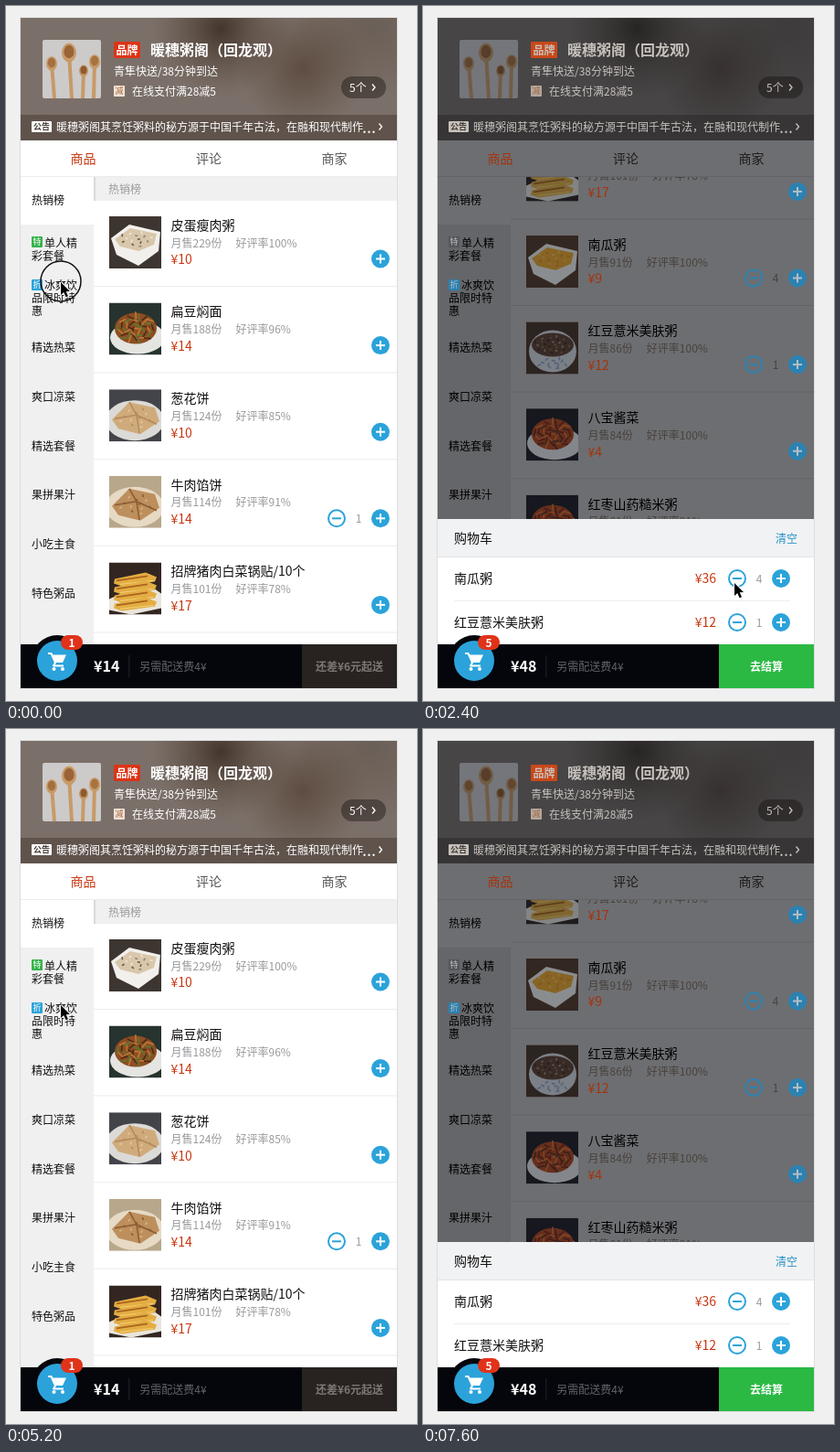
An HTML page with a canvas for the animation above (8 s loop, 450x760 px).

```html
<!DOCTYPE html>
<html lang="zh">
<head>
<meta charset="utf-8">
<style>
  html, body { margin: 0; width: 100%; height: 100%; overflow: hidden; background: #f0f0f0; }
  canvas { display: block; }
</style>
</head>
<body>
<canvas id="stage" width="450" height="760"></canvas>
<script>
const g = document.getElementById('stage').getContext('2d');
const FONT = '"Noto Sans CJK SC", "Noto Sans CJK", sans-serif';
const SHOP = '暖穗粥阁';

// [normal, behind the overlay]
const COLORS = {
  paper: ['#fff', '#6d6e71'], side: ['#f0f0f0', '#656669'], line: ['#ececec', '#626366'],
  ink: ['#111', '#000'], soft: ['#555', '#1d1b1a'], grey: ['#98999c', '#47423d'],
  red: ['#c8350f', '#a5330d'], blue: ['#2ba3da', '#2b82b2'], cross: ['#fff', '#b5bdc3'],
  head: ['#fff', '#c6c1bc'], brand: ['#dd3417', '#c9481a'], green: ['#35b34a', '#55565a']
};
let dim = 0;
const col = name => COLORS[name] ? COLORS[name][dim] : name;

// name, sold per month, rating, price, photo
const foods = [
  ['皮蛋瘦肉粥', 229, 100, 10, ['square', '#3d352f', '#f2f0ec', '#d9c7ab', ['#6b5a4b', '#f0e6d3', '#8d8578']]],
  ['扁豆焖面', 188, 96, 14, ['mound', '#26332e', '#e4e4e0', '#8d4d22', ['#c07a38', '#4b2a17', '#5d7a2f']]],
  ['葱花饼', 124, 85, 10, ['cake', '#43434a', '#dcdad6', '#cfab7c', ['#b48a58', '#e2c79c']]],
  ['牛肉馅饼', 114, 91, 14, ['cake', '#b9a78c', '#e6dac4', '#bd8f5c', ['#8a5c34', '#d8b282']]],
  ['招牌猪肉白菜锅贴/10个', 101, 78, 17, ['rolls', '#332621', '#e9e5dc', '#e3ad42', ['#a8641d', '#f4d27a']]],
  ['南瓜粥', 91, 100, 9, ['square', '#573a27', '#f6f3ee', '#efa92c', ['#f8c860', '#d98a18']]],
  ['红豆薏米美肤粥', 86, 100, 12, ['round', '#4b3424', '#d9dade', '#614230', ['#8f6b50', '#3a2318', '#b29577']]],
  ['八宝酱菜', 84, 100, 4, ['mound', '#221d22', '#e8e6e4', '#b4471e', ['#e0742f', '#7a2712', '#59301a']]],
  ['红枣山药糙米粥', 81, 91, 10, ['mound', '#221d22', '#e8e6e4', '#b4471e', ['#e0742f', '#7a2712', '#59301a']]],
  ['糊塌子', 80, 93, 10, ['cake', '#8d6a4b', '#a98461', '#d9bd8d', ['#b48f5c', '#c9a76f']]]
];
const BEEF = 3, PUMPKIN = 5, BEAN = 6;
const ROW = 94.6;

function rect(x, y, w, h, c, r = 0) {
  g.fillStyle = col(c);
  g.beginPath();
  g.roundRect(x, y, w, h, r);
  g.fill();
}
function oval(x, y, rx, ry, c, turn = 0) {
  g.fillStyle = col(c);
  g.beginPath();
  g.ellipse(x, y, rx, ry, turn, 0, 7);
  g.fill();
}
function poly(c, ...pts) {
  g.fillStyle = col(c);
  g.beginPath();
  for (let i = 0; i < pts.length; i += 2) g.lineTo(pts[i], pts[i + 1]);
  g.closePath();
  g.fill();
}
function stroke(c, width, ...pts) {
  g.strokeStyle = col(c);
  g.lineWidth = width;
  g.beginPath();
  for (let i = 0; i < pts.length; i += 2) g.lineTo(pts[i], pts[i + 1]);
  g.stroke();
}
function text(s, x, y, size, c, weight = 400, align = 'left') {
  g.font = `${weight} ${size}px ${FONT}`;
  g.textAlign = align;
  g.textBaseline = 'middle';
  g.fillStyle = col(c);
  g.fillText(s, x, y);
}
const shade = (x, y, w, h) => dim && rect(x, y, w, h, 'rgba(7,17,27,.45)');

// Piecewise linear value through [phase, ...values] keys
function along(keys, p) {
  const i = Math.max(1, keys.findIndex(k => k[0] >= p));
  const [a, b] = [keys[i - 1], keys[i]];
  const f = (p - a[0]) / (b[0] - a[0]);
  return a.slice(1).map((v, j) => v + (b[j + 1] - v) * f);
}

function crumbs(x, y, rx, ry, colors, count, len) {
  for (let i = 0; i < count; i++) {
    const a = i * 2.4, r = Math.sqrt((i + .5) / count);
    const px = x + rx * r * Math.cos(a), py = y + ry * r * Math.sin(a);
    const dx = len * Math.cos(i * 1.7), dy = len * Math.sin(i * 1.7);
    stroke(colors[i % colors.length], 1.6, px - dx, py - dy, px + dx, py + dy);
  }
}
const photos = {
  square(dish, food, bits) {
    poly(dish, 2, 24, 22, 9, 56, 17, 54, 38, 32, 54, 8, 42);
    poly(food, 6, 25, 23, 13, 52, 19, 49, 31, 32, 38, 12, 33);
    crumbs(29, 25, 18, 9, bits, 14, 1.5);
  },
  round(dish, food, bits) {
    oval(29, 32, 26, 23, dish);
    crumbs(29, 45, 18, 6, ['#8fa3c4'], 12, 2);
    oval(29, 25, 23, 13, food);
    crumbs(29, 25, 20, 10, bits, 26, 1.2);
  },
  mound(dish, food, bits) {
    oval(31, 38, 30, 18, dish);
    oval(29, 28, 23, 17, food);
    crumbs(29, 28, 20, 15, bits, 40, 4);
  },
  cake(dish, food, bits) {
    oval(28, 34, 32, 22, dish);
    poly(food, 3, 33, 22, 14, 50, 20, 55, 35, 34, 49, 10, 43);
    stroke(bits[0], 1.5, 6, 32, 30, 28, 52, 38);
    stroke(bits[0], 1.5, 22, 14, 30, 28, 33, 48);
    crumbs(29, 31, 20, 11, bits, 12, 1.5);
  },
  rolls(dish, food, bits) {
    poly(dish, 0, 40, 40, 22, 57, 34, 57, 50, 24, 57, 0, 52);
    for (let i = 0; i < 4; i++) {
      const y = 16 + i * 9;
      poly(food, 6, y + 2, 40, y - 5, 52, y, 50, y + 5, 14, y + 10, 5, y + 7);
      stroke(bits[0], 1.8, 8, y + 4, 42, y - 1);
      stroke(bits[1], 1, 12, y + 8, 48, y + 4);
    }
  }
};
function photo(x, y, [kind, bg, dish, food, bits]) {
  g.save();
  g.translate(x, y);
  g.beginPath();
  g.rect(0, 0, 57, 57);
  g.clip();
  rect(0, 0, 57, 57, bg);
  photos[kind](dish, food, bits);
  shade(0, 0, 57, 57);
  g.restore();
}

function plus(x, y) {
  oval(x, y, 10, 10, 'blue');
  stroke('cross', 2, x - 5, y, x + 5, y);
  stroke('cross', 2, x, y - 5, x, y + 5);
}
function minus(x, y, left = 0) {
  g.save();
  g.translate(x + 24 * left, y);
  g.rotate(Math.PI * left);
  g.strokeStyle = col('blue');
  g.lineWidth = 2;
  g.beginPath();
  g.arc(0, 0, 9, 0, 7);
  g.stroke();
  stroke('blue', 2, -5, 0, 5, 0);
  g.restore();
}

function header() {
  const blob = (x, y, r, c) => {
    const fill = g.createRadialGradient(x, y, 0, x, y, r);
    fill.addColorStop(0, c);
    fill.addColorStop(1, 'rgba(80,60,45,0)');
    g.fillStyle = fill;
    g.fillRect(16, 13, 412, 134);
  };
  g.save();
  g.beginPath();
  g.rect(16, 13, 412, 134);
  g.clip();
  rect(16, 13, 412, 134, '#7b7069');
  blob(235, 25, 75, 'rgba(48,34,25,.75)');
  blob(325, 68, 70, 'rgba(74,53,38,.6)');
  blob(400, 20, 80, 'rgba(90,80,70,.5)');
  rect(16, 119, 412, 28, 'rgba(30,18,10,.3)');

  rect(40, 37, 64, 64, '#cdcaca', 2);
  [[50, 63, 6, '#a4703f'], [69, 51, 8, '#9a6437'], [85, 71, 5, '#8e5a30'], [97, 61, 6, '#a8733f']].forEach(([x, y, r, c]) => {
    stroke('#c79a68', 4, x, y, x + (x < 80 ? 3 : -1), 101);
    oval(x, y, r, r * 1.3, '#c79a68');
    oval(x, y - 1, r * .7, r * .9, c);
  });
  shade(16, 13, 412, 134);
  g.restore();

  rect(118, 39, 29, 18, 'brand', 1);
  text('品牌', 132.5, 48, 12, 'head', 700, 'center');
  text(SHOP + '（回龙观）', 158, 48, 16, 'head', 700);
  text('青隼快送/38分钟到达', 118, 71, 12, 'head', 500);
  rect(118, 87, 12, 12, dim ? '#b3a79d' : '#f0e2d6', 1);
  text('减', 124, 93, 9, '#a8673f', 500, 'center');
  text('在线支付满28减5', 138, 93, 12, 'head', 500);
  rect(367, 77, 49, 24, 'rgba(15,10,8,.4)', 12);
  text('5个', 376, 89, 12, 'head', 500);
  stroke('head', 1.3, 401, 85.5, 404, 89, 401, 92.5);
  rect(28, 126, 22, 12, 'head', 1);
  text('公告', 39, 132, 9, '#443a34', 700, 'center');
  text(SHOP + '其烹饪粥料的秘方源于中国千年古法，在融和现代制作', 55, 132, 12, 'head', 500);
  text('...', 390, 132, 18, 'head', 500);
  stroke('head', 1.3, 408.5, 128.5, 411.5, 132, 408.5, 135.5);
}

function tabsAndMenu() {
  ['商品', '评论', '商家'].forEach((s, i) =>
    text(s, 84.5 + i * 137.5, 167, 14, i ? 'soft' : 'red', 500, 'center'));
  rect(16, 186, 412, 1, 'line');
  rect(16, 187, 80, 511, 'side');
  rect(16, 187, 80, 52, 'paper');
  text('热销榜', 28, 212, 12, 'ink');
  rect(28, 252, 12, 12, 'green', 1);
  text('特', 34, 258, 9, 'cross', 500, 'center');
  text('单人精', 42, 259, 12, 'ink');
  text('彩套餐', 28, 273, 12, 'ink');
  rect(28, 299, 12, 12, 'blue', 1);
  text('折', 34, 305, 9, 'cross', 500, 'center');
  text('冰爽饮', 42, 305.5, 12, 'ink');
  text('品限时特', 28, 319.5, 12, 'ink');
  text('惠', 28, 333.5, 12, 'ink');
  ['精选热菜', '爽口凉菜', '精选套餐', '果拼果汁', '小吃主食', '特色粥品'].forEach((s, i) =>
    text(s, 28, 373.5 + i * 53.8, 12, 'ink'));
}

function heading(s, y) {
  rect(96, y, 332, 26, 'side');
  rect(96, y, 2, 26, dim ? '#55585b' : '#d6d9dd');
  text(s, 112, y + 13, 12, 'grey');
}
function foodList(scroll, counts, entering) {
  g.save();
  g.beginPath();
  g.rect(96, 187, 332, 511);
  g.clip();
  heading('热销榜', 187 - scroll);
  foods.forEach(([name, sold, rating, price, picture], i) => {
    const y = 230 + i * ROW - scroll;
    if (y < 100 || y > 700) return;
    photo(113, y, picture);
    text(name, 180.5, y + 9.5, 14, 'ink');
    const sales = `月售${sold}份`;
    text(sales, 180.5, y + 29, 12, 'grey');
    text('好评率' + rating + '%', 180.5 + g.measureText(sales).width + 15, y + 29, 12, 'grey');
    text('¥' + price, 180.5, y + 47, 14, 'red', 500);
    plus(410, y + 46.5);
    if (counts[i]) {
      minus(362, y + 46.5, i === PUMPKIN ? entering : 0);
      text(counts[i], 386, y + 46.5, 12, 'grey', 400, 'center');
    }
    rect(96, y + 76, 332, 1, 'line');
  });
  heading('单人精彩套餐', 230 + 10 * ROW - scroll - 18);
  g.restore();
}

function cartPanel(counts) {
  const rows = foods.map((f, i) => [f[0], f[3], counts[i]]).filter(r => r[2]);
  const top = 698 - 41 - rows.length * 48;
  rect(16, top, 412, 698 - top, '#fff');
  rect(16, top, 412, 41, '#f1f2f3');
  rect(16, top + 41, 412, 1, '#e2e4e6');
  text('购物车', 34, top + 21, 14, 'ink');
  text('清空', 410, top + 21, 12, '#2492c8', 400, 'right');
  rows.forEach(([name, price, n], i) => {
    const y = top + 65 + i * 48;
    text(name, 34, y, 14, 'ink');
    text('¥' + price * n, 321, y, 14, 'red', 500, 'right');
    minus(344, y);
    text(n, 368, y, 12, 'grey', 400, 'center');
    plus(392, y);
    if (i < rows.length - 1) rect(34, y + 24, 368, 1, '#ececec');
  });
}

function cartBar(counts) {
  const total = foods.reduce((sum, f, i) => sum + f[3] * (counts[i] || 0), 0);
  const pieces = Object.values(counts).reduce((a, b) => a + b, 0);
  const ready = total >= 20;
  rect(16, 698, 412, 48, '#04060c');
  oval(56, 716, 28, 28, '#04060c');
  oval(56, 716, 22, 22, 'blue');
  g.lineJoin = 'round';
  stroke('#fff', 2, 46, 708, 49.5, 708, 54, 718, 52, 721.5, 63, 721.5);
  poly('#fff', 50.5, 709.5, 66, 709.5, 62, 718, 54, 718);
  oval(52.5, 725, 2, 2, '#fff');
  oval(62, 725, 2, 2, '#fff');
  rect(60, 688, 24, 16, '#e0331a', 8);
  text(pieces, 72, 696, 12, '#fff', 700, 'center');
  text('¥' + total, 96, 722, 16, '#fff', 700);
  const x = 106 + g.measureText('¥' + total).width;
  rect(x, 710, 1, 24, '#22252b');
  text('另需配送费4¥', x + 12, 722, 12, '#62646a');
  rect(324, 698, 104, 48, ready ? '#2bb944' : '#282321');
  text(ready ? '去结算' : `还差¥${20 - total}元起送`, 376, 722, 12, ready ? '#fff' : '#7d7875', 700, 'center');
}

// A dropped ball flies from the pumpkin row's button into the cart
function ball(f) {
  const rise = f - (1.84 + 1.05 * f) * f * (1 - f);
  oval(410 - 354 * f, 298 + 418 * rise, 8, 8, 'blue');
}

function pointer(x, y, ring) {
  if (ring) {
    g.strokeStyle = '#111';
    g.lineWidth = 1.5;
    g.beginPath();
    g.arc(x, y - 1, 22, 0, 7);
    g.stroke();
  }
  g.save();
  g.translate(x, y);
  const arrow = [0, 0, 0, 14, 3.2, 11, 5.6, 16.2, 8, 15.2, 5.7, 10.2, 10, 10];
  stroke('#fff', 2, ...arrow, 0, 0);
  poly('#000', ...arrow);
  g.restore();
}

const scrollKeys = [[0, 0], [1, 0], [5, 481], [7, 453.5], [8, 452], [19, 452]];
const pointerKeys = [[0, 60, 302], [2, 200, 560], [5, 357, 384], [7, 404, 384], [9, 409, 384],
  [12, 408, 297], [13, 408, 297], [14, 56, 716], [15, 345, 575], [16, 349, 577], [18, 341, 631], [19, 341, 631]];

function draw(phase) {
  const p = phase === 19 ? 0 : phase;
  const open = p >= 14;
  const counts = {
    [BEEF]: p < 16 ? 1 : 0,
    [PUMPKIN]: p < 12 ? 0 : p === 12 ? 2 : p < 17 ? 5 : 4,
    [BEAN]: p < 8 ? 0 : 1
  };
  dim = 0;
  rect(0, 0, 450, 760, '#f0f0f0');
  rect(15, 12, 414, 735, '#dcdcdc');
  dim = +open;
  rect(16, 13, 412, 733, 'paper');
  header();
  tabsAndMenu();
  foodList(along(scrollKeys, p)[0], counts, p === 12 ? .2 : 0);
  dim = 0;
  if (open) cartPanel(counts);
  cartBar(counts);
  if (p === 12) [.39, .88].forEach(ball);
  if (p === 13) ball(.55);
  if (p !== 17) pointer(...along(pointerKeys, p), phase === 0);
}

// The 20-phase visit is shown three phases further at every 400 ms step
let shown = -1;
function tick() {
  const step = Math.floor(performance.now() % 8000 / 400);
  if (step !== shown) draw((shown = step) * 3 % 20);
  requestAnimationFrame(tick);
}
tick();
</script>
</body>
</html>
```
